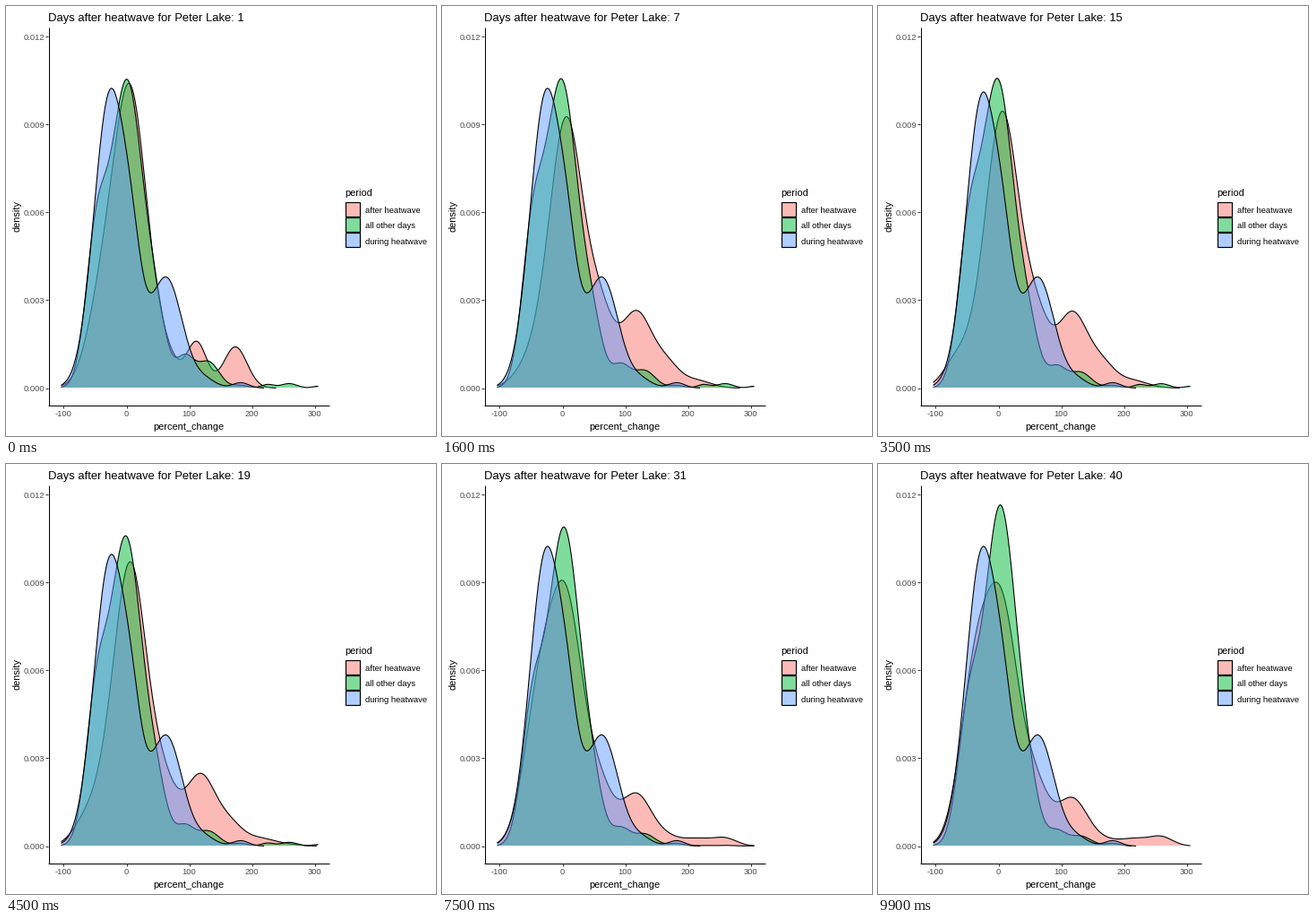
These frames come from a looping animation (480 px wide and 480 px high, 10000 ms). A matplotlib script:

```python
import numpy as np
import matplotlib.pyplot as plt
from matplotlib.animation import FuncAnimation
from matplotlib.patches import Polygon, Rectangle

SIZE, FRAMES, DAYS = 480, 100, 40
LEFT, RIGHT, BASE = 62, 348, 426.5  # extent of the curves, row of zero density
RED, GREEN, BLUE = "#F8766D", "#00BA38", "#619CFF"

plt.rcParams["font.family"] = ["Liberation Sans", "DejaVu Sans"]
fig = plt.figure(figsize=(SIZE / 72, SIZE / 72), dpi=72, facecolor="white")
ax = fig.add_axes([0, 0, 1, 1])
ax.set(xlim=(0, SIZE), ylim=(SIZE, 0))
ax.axis("off")


def label(x, y, text, size, color="black", **kw):
    return ax.text(x, y, text, fontsize=size, color=color, **kw)


def stroke(xs, ys, color="black"):
    ax.plot(xs, ys, color=color, lw=1, solid_capstyle="butt", zorder=5)


def bell(x, centre, width):
    return np.exp(-((x - centre) / width) ** 2 / 2)


def ease(t, start, end):
    u = np.clip((t - start) / (end - start), 0, 1)
    return u * u * (3 - 2 * u)


# Each mix lists the bells (centre, width, height) that add up to a curve.
def after_mix(t):
    settled = np.clip(t / 9, 0, 1)
    start = 1 - settled
    late = ease(t, 30, 90)
    dip = bell(t, 24, 9)
    return [
        (139, 18, 320 - 73 * late - 42 * dip),
        (108, 17, 15 + 78 * start + 160 * late + 30 * dip),
        (85, 14, 22 * bell(t, 35, 12)),
        (176, 15.5, 60 - 26 * start + 30 * dip),
        (217, 16.5, settled * (82 - 30 * late)),
        (250, 15, settled * (26 - 20 * late)),
        (285, 16, 8 * settled),
        (316, 13, 10 * late),
        (213, 11, 50 * start),
        (256, 13, 46 * start),
    ]


def other_mix(t):
    u = t / (FRAMES - 1)
    start = 1 - np.clip(t / 9, 0, 1)
    late = ease(t, 30, 90)
    return [
        (133.5 + 1.5 * start + 3 * late, 18, 341 + 37 * u ** 4),
        (100.5, 12, 148 - 20 * u),
        (168, 12, 58 - 14 * u),
        (200, 10, 26 - 10 * u + 7 * start),
        (226, 12, 21 - 10 * u + 8 * start),
        (262, 8, 3),
        (292, 7, 4 * (1 - late)),
        (316, 9, 5 * (1 - late)),
        (348, 6, 2 * (1 - late)),
    ]


def during_mix(t):
    return [
        (116.3, 18, 328 - 9 * bell(t, 45, 8)),
        (141.5, 11, 75),
        (178.7, 18, 123),
        (223, 12, 8),
        (262, 9, 6),
    ]


class Density:
    def __init__(self, color, mix, z):
        self.mix = mix
        self.x = np.linspace(LEFT, RIGHT, 512)
        self.area = ax.add_patch(Polygon([(0, 0), (1, 1), (0, 1)], fc=color,
                                         alpha=0.5, lw=0, zorder=z))
        self.line, = ax.plot([], [], color="black", lw=1.1, zorder=z + 0.5)

    def update(self, t):
        h = sum(height * bell(self.x, centre, width)
                for centre, width, height in self.mix(t))
        end = np.flatnonzero(h > 0.1)[-1] + 1
        self.line.set_data(self.x[:end], BASE - h[:end])
        floor = BASE - 0.5
        top = np.column_stack([self.x, np.minimum(BASE - h, floor)])
        self.area.set_xy(np.vstack([[LEFT, floor], top, [RIGHT, floor]]))


curves = [Density(RED, after_mix, 1), Density(GREEN, other_mix, 2),
          Density(BLUE, during_mix, 3)]

# Axes
stroke([47.5, 47.5], [24, 446])
stroke([47, 361], [445.5, 445.5])
for v in range(-100, 301, 100):
    x = 134.5 + 0.703 * v
    stroke([x, x], [446, 449], "#333333")
    label(x - 0.5, 458.5, str(v), 9.2, "#4D4D4D", ha="center")
for i in range(5):
    y = BASE - 98.25 * i
    stroke([44, 47], [y, y], "#333333")
    label(43, y + 4, f"{0.003 * i:.3f}", 9.4, "#4D4D4D", ha="right")
label(204, 473, "percent_change", 11, ha="center")
label(12.5, 235, "density", 11, ha="center", va="center", rotation=90)

# Legend
label(378, 212, "period", 11)
for i, (name, color) in enumerate([("after heatwave", RED),
                                   ("all other days", GREEN),
                                   ("during heatwave", BLUE)]):
    y = 218.5 + 17.28 * i
    box = (378.5, y), 16, 16
    ax.add_patch(Rectangle(*box, fc=color, alpha=0.5, lw=0))
    ax.add_patch(Rectangle(*box, fill=False, ec="black", lw=1.2))
    label(401, y + 12.5, name, 9.4)

title = label(47, 17, "", 12.95)


def draw(frame):
    day = round(1 + (DAYS - 1) * frame / (FRAMES - 1))
    title.set_text(f"Days after heatwave for Peter Lake: {day}")
    for curve in curves:
        curve.update(frame)


anim = FuncAnimation(fig, draw, frames=FRAMES, interval=100, repeat=True,
                     repeat_delay=0, init_func=lambda: draw(0))
plt.show()
```
